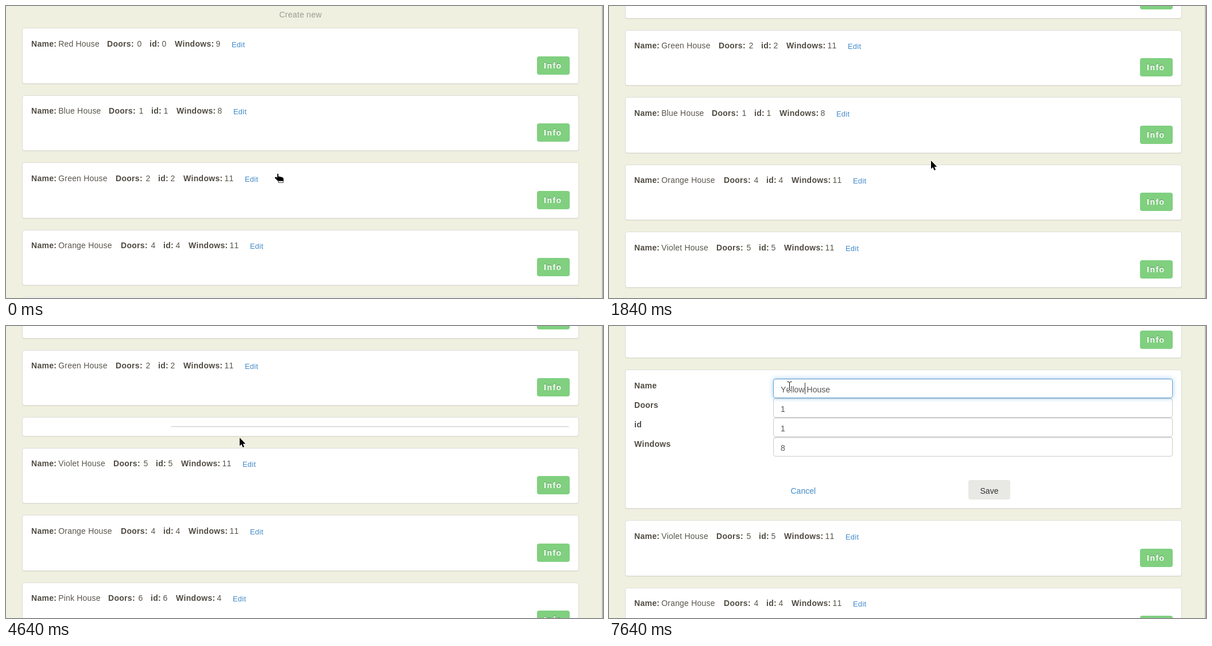
An HTML page for the animation above (8000 ms loop, 1040 px wide and 510 px high).

```html
<!DOCTYPE html>
<html lang="en">
<head>
<meta charset="utf-8">
<title>House list</title>
<style>
html, body { margin: 0; width: 100%; height: 100%; overflow: hidden; }
body {
  position: relative; background: #f0f0e0; color: #59554c;
  font: 14px/20px "Liberation Sans", Arial, sans-serif; font-kerning: none;
}
body::after { content: ""; position: absolute; left: 1038px; top: 0; width: 2px; height: 100%; background: #b8b8b8; }
.card, .card *, .slot, #create { position: absolute; box-sizing: border-box; white-space: pre; }
.card {
  left: 28px; width: 970px; background: #fff;
  border: 1px solid #ddddd8; border-radius: 4px; box-shadow: 0 1px 1px rgba(0,0,0,.06);
  transform-origin: 50% 0;
}
.card.drag { z-index: 2; transform: scale(1.025); box-shadow: 0 5px 12px rgba(0,0,0,.72); }
.slot { left: 28px; width: 970px; height: 98px; border-radius: 4px; background: #e1e1d3; }
#create { left: 0; width: 1026px; text-align: center; color: #9b9a92; letter-spacing: .25px; }
b { color: #504b42; letter-spacing: .3px; }
.val { letter-spacing: .2px; }
.link { color: #428bca; }
.edit { font-size: 13px; line-height: 19px; letter-spacing: .2px; }
.edit.hover { color: #2a6496; text-decoration: underline; }
.info {
  width: 57px; height: 32px; border-radius: 4px; background: #80d080; color: #fff;
  font-weight: bold; line-height: 32px; letter-spacing: 1.5px; padding-left: 12px;
  text-shadow: 0 -1px 0 rgba(0,0,0,.32);
}
.form { left: 0; top: 0; width: 968px; height: 226px; }
.input {
  width: 696px; height: 34px; padding: 8px 12px 4px; color: #555; background: #fff;
  border: 1px solid #ccc; border-radius: 4px; box-shadow: inset 0 1px 1px rgba(0,0,0,.075);
  letter-spacing: .05px;
}
.input.focus {
  z-index: 1; border-color: #66a3d8;
  box-shadow: inset 0 1px 1px rgba(0,0,0,.075), 0 0 8px rgba(102,175,233,.6);
}
.input span { position: relative; }
.picked { color: #fff; }
.picked::before {
  content: ""; position: absolute; z-index: -1; left: 0; right: 0; top: -2px; height: 20px; background: #428bca;
}
.input .word { z-index: 0; }
.caret { width: 1px; height: 20px; margin-top: -2px; background: #333; }
.save { width: 73px; height: 34px; border-radius: 4px; background: #e8e9e4; color: #333; text-align: center; padding-top: 9px; }
#cursor { position: absolute; z-index: 5; left: 0; top: 0; overflow: visible; }
</style>
</head>
<body>
<div id="create">Create new</div>
<div class="slot"></div>
<svg id="cursor" width="1" height="1">
  <g data-kind="hand" stroke-linejoin="round">
    <path d="M-2.5 .5Q-1.5-1-.5 .5V4.5L6 6Q8.5 6.5 8.5 9V13H-1L-6.5 7.5Q-7 5.5-4.5 5.5L-2.5 7Z" stroke="#fff" stroke-width="1.4" paint-order="stroke"/>
    <path d="M-.5 12.5H8V15.5H-.5Z" fill="#fff" stroke="#444" stroke-width="1"/>
  </g>
  <g data-kind="fist" stroke-linejoin="round">
    <path d="M-5 7L-2.5 5.5V3L-.5 1.5 1 2.5 3 2 4.5 3.5 6.5 4V12H-4L-6 10Z" stroke="#fff" stroke-width="1.4" paint-order="stroke"/>
    <path d="M-4 11.5H7.5V14.5H-2.5Z" fill="#fff" stroke="#444" stroke-width="1"/>
  </g>
  <path data-kind="arrow" d="M0 0V14.5L3.3 11.5 5.6 17 8 16 5.8 10.7H10.3Z" stroke="#fff" stroke-width="1.4" paint-order="stroke"/>
  <g data-kind="beam" fill="none">
    <path id="bar" d="M-3.5-7.5H-1L.5-6.5 2-7.5H4.5M.5-6.5V6.5M-3.5 7.5H-1L.5 6.5 2 7.5H4.5" stroke="#fff" stroke-width="3"/>
    <use href="#bar"/>
    <path d="M-3.5-7.5H-1L.5-6.5 2-7.5H4.5M.5-6.5V6.5M-3.5 7.5H-1L.5 6.5 2 7.5H4.5" stroke="#111"/>
  </g>
</svg>
<script>
const LOOP = 8000, TOP = 38.4, GAP = 20, CARD = 97.5, FORM = 210.9;
const $ = s => document.querySelector(s);

// name: [doors, id, windows, x of the "Doors" label]
const houses = {
  Red: [0, 0, 9, 176], Blue: [1, 1, 8, 179], Green: [2, 2, 11, 191],
  Orange: [4, 4, 11, 200], Violet: [5, 5, 11, 187], Pink: [6, 6, 4, 178]
};

// Scroll position and pointer path as [ms, values...]
const scrollKeys = [[1560, 0], [1760, 114], [5100, 114], [5300, 197]];
const pointerKeys = [
  [40, 475, 293], [140, 447, 298], [200, 447, 299], [300, 476, 296], [580, 476, 296],
  [800, 502, 281], [1080, 543, 224], [1250, 552, 170], [1340, 553, 164], [1520, 553, 164],
  [1840, 561, 270], [2050, 567, 311], [2190, 567, 311], [2460, 567, 435], [2740, 568, 465],
  [3000, 568, 465], [3770, 404, 202], [3850, 405, 200], [4080, 405, 200], [4180, 407, 195],
  [5060, 407, 195], [5380, 329, 133], [5420, 329, 133], [5670, 314, 109], [5980, 314, 109], [6020, 314, 105]
];
const drags = [
  { name: 'Green', from: 580, to: 1520, grip: 23 },
  { name: 'Orange', from: 2190, to: 3000, grip: 35 }
];
const typed = [[6700, 'Y'], [6870, 'Ye'], [6960, 'Yel'], [7120, 'Yell'], [7280, 'Yello'], [7640, 'Yellow']];

function track(keys, t) {
  const i = keys.findIndex(k => k[0] > t);
  if (i === 0) return keys[0].slice(1);
  if (i < 0) return keys[keys.length - 1].slice(1);
  const a = keys[i - 1], b = keys[i], p = (t - a[0]) / (b[0] - a[0]);
  return a.slice(1).map((v, j) => v + (b[j + 1] - v) * p);
}

// Places a child at stage x and at y below the card's top edge
function put(parent, tag, cls, text, x, y) {
  const el = document.createElement(tag);
  el.className = cls;
  el.textContent = text;
  el.style.left = x - 29 + 'px';
  el.style.top = y - 1 + 'px';
  parent.append(el);
  return el;
}

function makeCard(name) {
  const [doors, id, windows, x] = houses[name];
  const el = document.createElement('div');
  el.className = 'card';
  const row = document.createElement('div');
  row.style.cssText = 'left:0;top:0';
  const label = (text, x) => put(row, 'b', '', text, x, 17.5);
  const value = (text, x) => put(row, 'span', 'val', text, x, 17.5);
  label('Name:', 44);
  value(name + ' House', 91.2);
  label('Doors:', x);
  value(doors, x + 52.4);
  label('id:', x + 74);
  value(id, x + 95.4);
  label('Windows:', x + 118);
  value(windows, x + 189.4);
  const edit = put(row, 'span', 'link edit', 'Edit', x + 217 + (windows > 9 ? 8 : 0), 19.5);
  put(row, 'span', 'info', 'Info', 925, 49.5);
  el.append(row);
  document.body.append(el);
  return { el, row, edit };
}

function makeForm(card) {
  const form = document.createElement('div');
  form.className = 'form';
  const inputs = ['Name', 'Doors', 'id', 'Windows'].map((text, i) => {
    put(form, 'b', '', text, 44, 18 + 34 * i);
    return put(form, 'div', 'input', ['', 1, 1, 8][i], 286, 16 + 34 * i);
  });
  put(form, 'span', 'link', 'Cancel', 316.5, 202);
  put(form, 'span', 'save', 'Save', 626, 193);
  inputs[0].innerHTML = '<span class="word"></span><span class="caretbox"><i class="caret"></i></span><span> House</span>';
  card.append(form);
  return { el: form, name: inputs[0], word: $('.word'), caret: $('.caret') };
}

const cards = {};
for (const name in houses) cards[name] = makeCard(name);
const form = makeForm(cards.Blue.el);
const slot = $('.slot'), create = $('#create'), cursor = $('#cursor');
const shapes = [...cursor.querySelectorAll('[data-kind]')];
const show = (el, on) => el.style.display = on ? '' : 'none';

function order(t) {
  const list = ['Red', 'Blue', 'Green', 'Orange', 'Violet', 'Pink'];
  if (t >= 1150) [list[1], list[2]] = [list[2], list[1]];
  if (t >= 2500) [list[3], list[4]] = [list[4], list[3]];
  return list;
}

function drawForm(t, open, grown) {
  show(form.el, open);
  show(cards.Blue.row, !open);
  form.el.style.clipPath = `inset(-12px -12px ${FORM - grown}px)`;
  form.name.classList.toggle('focus', t >= 5022);
  const key = typed.filter(k => k[0] <= t).pop();
  form.word.textContent = key ? key[1] : 'Blue';
  form.word.classList.toggle('picked', t >= 5820 && !key);
  const early = t >= 5022 && t < 5530;
  show(form.caret, early || key);
  form.caret.style.left = early ? '-28px' : '0';
}

function draw(t) {
  const [scroll] = track(scrollKeys, t), [x, y] = track(pointerKeys, t);
  const drag = drags.find(d => t >= d.from && t < d.to);
  const open = t >= 4580;
  const p = Math.min(1, Math.max(0, (t - 4622) / 400));
  const grown = FORM * (.5 - Math.cos(Math.PI * p) / 2);

  let top = TOP - scroll, overCard = false;
  create.style.top = 5 - scroll + 'px';
  show(slot, drag);
  for (const name of order(t)) {
    const { el, edit } = cards[name], held = drag && drag.name === name;
    const height = name === 'Blue' && open ? 32 + grown : CARD;
    if (held) slot.style.top = top + 'px';
    el.classList.toggle('drag', !!held);
    el.style.top = (held ? y - drag.grip : top) + 'px';
    el.style.height = height + 'px';
    edit.classList.toggle('hover',
      name === 'Green' && t >= 110 && t < 280 || name === 'Blue' && t >= 4080 && !open);
    overCard = overCard || y >= top && y <= top + height;
    top += (held ? 98 : height) + GAP;
  }
  drawForm(t, open, grown);

  const kind = drag ? 'fist' : t >= 4900 ? 'beam' : overCard && !open ? 'hand' : 'arrow';
  for (const s of shapes) show(s, s.dataset.kind === kind);
  cursor.style.transform = `translate(${Math.round(x)}px, ${Math.round(y)}px)`;
}

const start = performance.now();
function frame() {
  draw((performance.now() - start) % LOOP);
  requestAnimationFrame(frame);
}
frame();
</script>
</body>
</html>
```
